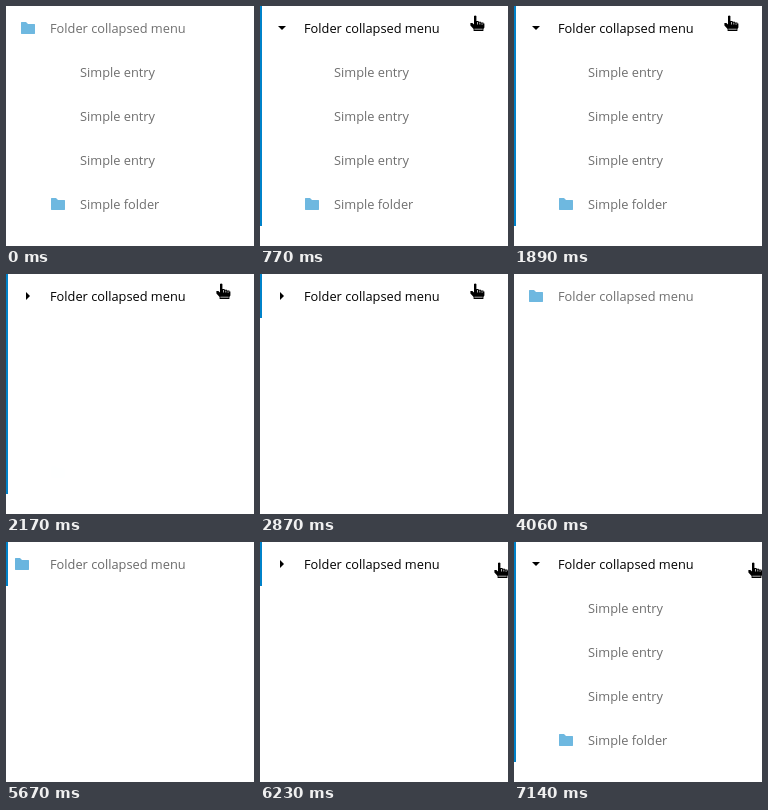
Write an HTML page with a canvas that moves like this. It is 248 by 240 pixels and loops after 8 s.

```html
<!DOCTYPE html>
<html lang="en">
<head>
<meta charset="utf-8">
<title>Collapsible menu</title>
<style>
html, body { margin: 0; width: 100%; height: 100%; overflow: hidden; background: #fff; }
canvas { display: block; width: 248px; height: 240px; }
</style>
</head>
<body>
<canvas id="stage" width="248" height="240"></canvas>
<script>
const ctx = document.getElementById('stage').getContext('2d');
const LOOP = 8000, STEP = 70, ROW = 44, DIM = 0.57;
const BLUE = '#0082c9';

const folderShape = new Path2D(
  'M1.5 2c-.25 0-.5.25-.5.5v11c0 .26.24.5.5.5h13c.26 0 .5-.24.5-.5v-9c0-.25-.25-.5-.5-.5H8L6 2z');
const handShape = new Path2D(
  'M4 1Q5.2 0 6.4 1V6H8.6V6.8H11V7.6H13.4V8.6H14.4V12.6L13.4 14V16H3.6V14L.4 10.4V8H2.4L4 9.4Z');
const handLines = new Path2D('M7.5 7V9.5M9.8 7.6V9.5M12.1 8.4V9.8M4.4 14.2H12.6');

// Pointer position at given times; it is out of view outside these spans.
const visits = [
  [[560, 246, -17], [770, 210, 9], [3360, 210, 9], [3640, 216, 11], [3710, 216, 11], [3990, 229, -18]],
  [[5670, 218, -17], [6230, 234, 20], [LOOP, 234, 20]]
];

const clamp = v => Math.max(0, Math.min(1, v));
const ease = v => v * v * (3 - 2 * v);
const ramp = (t, from, to) => ease(clamp((t - from) / (to - from)));
const mix = (a, b, k) => a + (b - a) * k;

function pointerAt(t) {
  for (const path of visits) {
    for (let i = 1; i < path.length; i++) {
      const a = path[i - 1], b = path[i];
      if (t >= a[0] && t < b[0]) {
        const k = ramp(t, a[0], b[0]);
        return [Math.round(mix(a[1], b[1], k)), Math.round(mix(a[2], b[2], k))];
      }
    }
  }
  return null;
}

function label(text, x, row, alpha) {
  ctx.globalAlpha = alpha;
  ctx.fillStyle = '#000';
  ctx.fillText(text, x, row * ROW + 27);
}

function folder(x, row, alpha) {
  ctx.save();
  ctx.globalAlpha = alpha;
  ctx.translate(x, row * ROW + 14);
  ctx.fillStyle = BLUE;
  ctx.fill(folderShape);
  ctx.restore();
}

function triangle(open, alpha) {
  ctx.save();
  ctx.globalAlpha = alpha;
  ctx.translate(22, 22);
  if (!open) ctx.rotate(-Math.PI / 2);
  ctx.fillStyle = '#000';
  ctx.beginPath();
  ctx.moveTo(-4, -2);
  ctx.lineTo(4, -2);
  ctx.lineTo(0, 2);
  ctx.fill();
  ctx.restore();
}

function hand([x, y]) {
  ctx.save();
  ctx.translate(x, y);
  ctx.lineJoin = 'round';
  ctx.strokeStyle = '#fff';
  ctx.lineWidth = 2;
  ctx.stroke(handShape);
  ctx.fillStyle = '#000';
  ctx.fill(handShape);
  ctx.lineWidth = 0.7;
  ctx.stroke(handLines);
  ctx.restore();
}

function draw(t) {
  const open = t < 2030 || t >= 6860;
  const hovered = (t >= 560 && t < 3850) || t >= 5670;
  const since = t < 5670 ? t - 560 : t - 5670;
  const lit = t < 3850 ? ramp(t, 540, 700)
    : t < 5670 ? 1 - ramp(t, 3780, 4000)
    : ramp(t, 5650, 5810);
  const entries = t < 5000 ? 1 - ramp(t, 1980, 2180) : ramp(t, 6800, 7010);
  const bar = t < 5000
    ? mix(5 * ROW, ROW, ramp(t, 2310, 2870))
    : mix(ROW, 5 * ROW, ramp(t, 6790, 7070));

  ctx.globalAlpha = 1;
  ctx.fillStyle = '#fff';
  ctx.fillRect(0, 0, 248, 240);
  ctx.font = '12.8px "Open Sans", sans-serif';

  if (hovered) {
    ctx.fillStyle = BLUE;
    ctx.fillRect(0, 0, 2, Math.round(bar));
  }

  const alpha = mix(DIM, 1, lit);
  label('Folder collapsed menu', 44, 0, alpha);
  if (!hovered) folder(14, 0, alpha);
  else if (since < STEP) folder(8, 0, alpha);
  else triangle(open, lit);

  if (entries > 0) {
    ctx.save();
    ctx.beginPath();
    ctx.rect(0, 0, 248, bar);
    ctx.clip();
    for (let row = 1; row < 4; row++) label('Simple entry', 74, row, DIM * entries);
    label('Simple folder', 74, 4, DIM * entries);
    folder(44, 4, DIM * entries);
    ctx.restore();
  }

  ctx.globalAlpha = 1;
  const pointer = pointerAt(t);
  if (pointer) hand(pointer);
}

const start = performance.now();
function tick() {
  const t = (performance.now() - start) % LOOP;
  draw(Math.floor(t / STEP) * STEP);
  requestAnimationFrame(tick);
}
tick();
</script>
</body>
</html>
```
